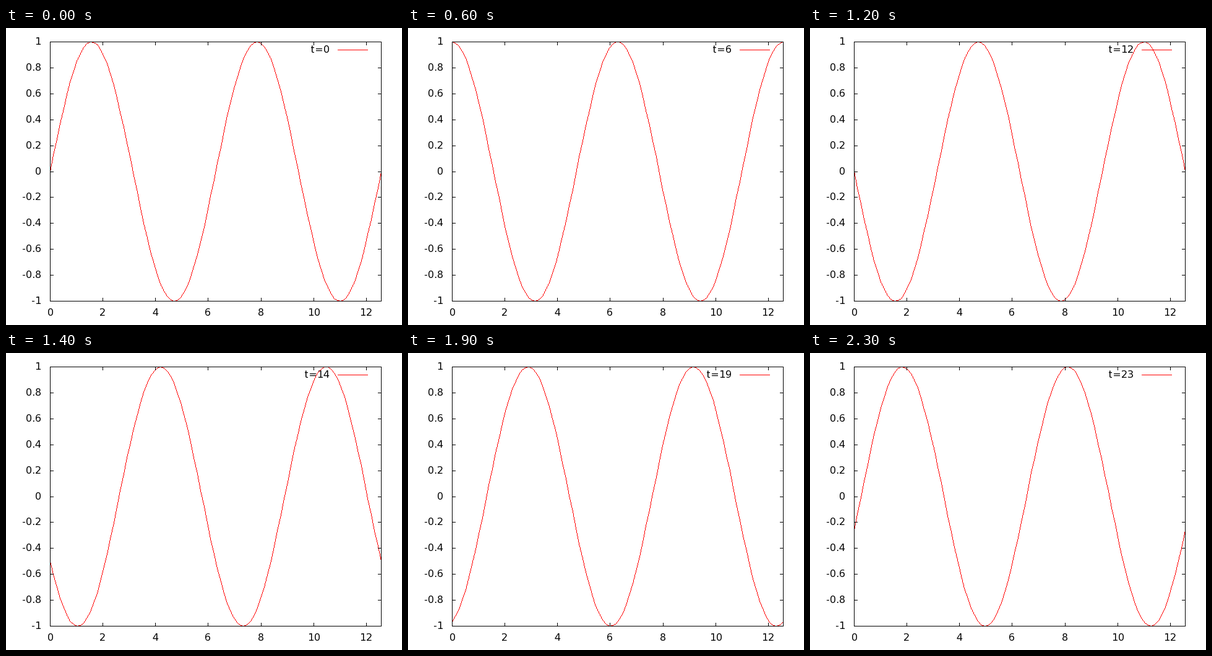
Recreate the animation shown at these times as a matplotlib script. Size 640 by 480 pixels, loop 2.4 s.

```python
import numpy as np
import matplotlib.pyplot as plt
from matplotlib.animation import FuncAnimation

W, H, DPI = 640, 480, 100
FRAMES, INTERVAL = 24, 100
LEFT, RIGHT, TOP, BOTTOM = 71, 606, 22, 441
X_MAX = 4 * np.pi
TICK = 5
PX = 72 / DPI
RED = (255, 0, 0, 255)

plt.rcParams["font.family"] = "DejaVu Sans"
plt.rcParams["text.hinting"] = "force_autohint"
plt.rcParams["text.hinting_factor"] = 1

fig = plt.figure(figsize=(W / DPI, H / DPI), dpi=DPI, facecolor="white")
ax = fig.add_axes([0, 0, 1, 1])
ax.set_xlim(0, W)
ax.set_ylim(H, 0)
ax.axis("off")


def to_px(x):
    return np.floor(LEFT + x / X_MAX * (RIGHT - LEFT) + 0.5)


def to_py(y):
    return np.floor((TOP + BOTTOM) / 2 - y * (BOTTOM - TOP) / 2 + 0.5)


def line(xs, ys, color="black"):
    """Straight one-pixel line through pixel centres."""
    ax.plot(np.asarray(xs) + 0.5, np.asarray(ys) + 0.5, color=color, lw=PX,
            antialiased=False, snap=False, solid_capstyle="projecting",
            solid_joinstyle="miter", zorder=3)


def label(x, y, s, ha):
    return ax.text(x, y + 5, s, ha=ha, va="baseline", fontsize=16 * PX,
                   color="black", zorder=1)


def raster(xs, ys):
    """Polyline as an image, one pixel per step along the longer side."""
    img = np.zeros((H, W, 4), np.uint8)
    for x0, y0, x1, y1 in zip(xs, ys, xs[1:], ys[1:]):
        n = int(max(abs(x1 - x0), abs(y1 - y0))) + 1
        cols = np.rint(np.linspace(x0, x1, n)).astype(int)
        rows = np.rint(np.linspace(y0, y1, n)).astype(int)
        img[rows, cols] = RED
    return img


# Border, ticks and tick labels
line([LEFT, RIGHT, RIGHT, LEFT, LEFT], [TOP, TOP, BOTTOM, BOTTOM, TOP])
for v in range(0, 13, 2):
    x = to_px(v)
    line([x, x], [BOTTOM, BOTTOM - TICK])
    line([x, x], [TOP, TOP + TICK])
    label(x + 0.5, 460, str(v), "center")
for k in range(-5, 6):
    y = to_py(k / 5)
    line([LEFT, LEFT + TICK], [y, y])
    line([RIGHT, RIGHT - TICK], [y, y])
    label(57, y, f"{k / 5:g}", "right")

# Key
key = label(523, 35, "t=0", "right")
line([536, 584], [35, 35], "red")

xs = np.linspace(0, X_MAX, 100)
wave = ax.imshow(raster(to_px(xs), to_py(np.sin(xs))), extent=(0, W, H, 0),
                 aspect="auto", interpolation="nearest", zorder=2)


def update(t):
    ys = np.sin(xs + 2 * np.pi * t / FRAMES)
    wave.set_data(raster(to_px(xs), to_py(ys)))
    key.set_text(f"t={t}")
    return wave, key


anim = FuncAnimation(fig, update, frames=FRAMES, interval=INTERVAL,
                     repeat=True, repeat_delay=0)
plt.show()
```
